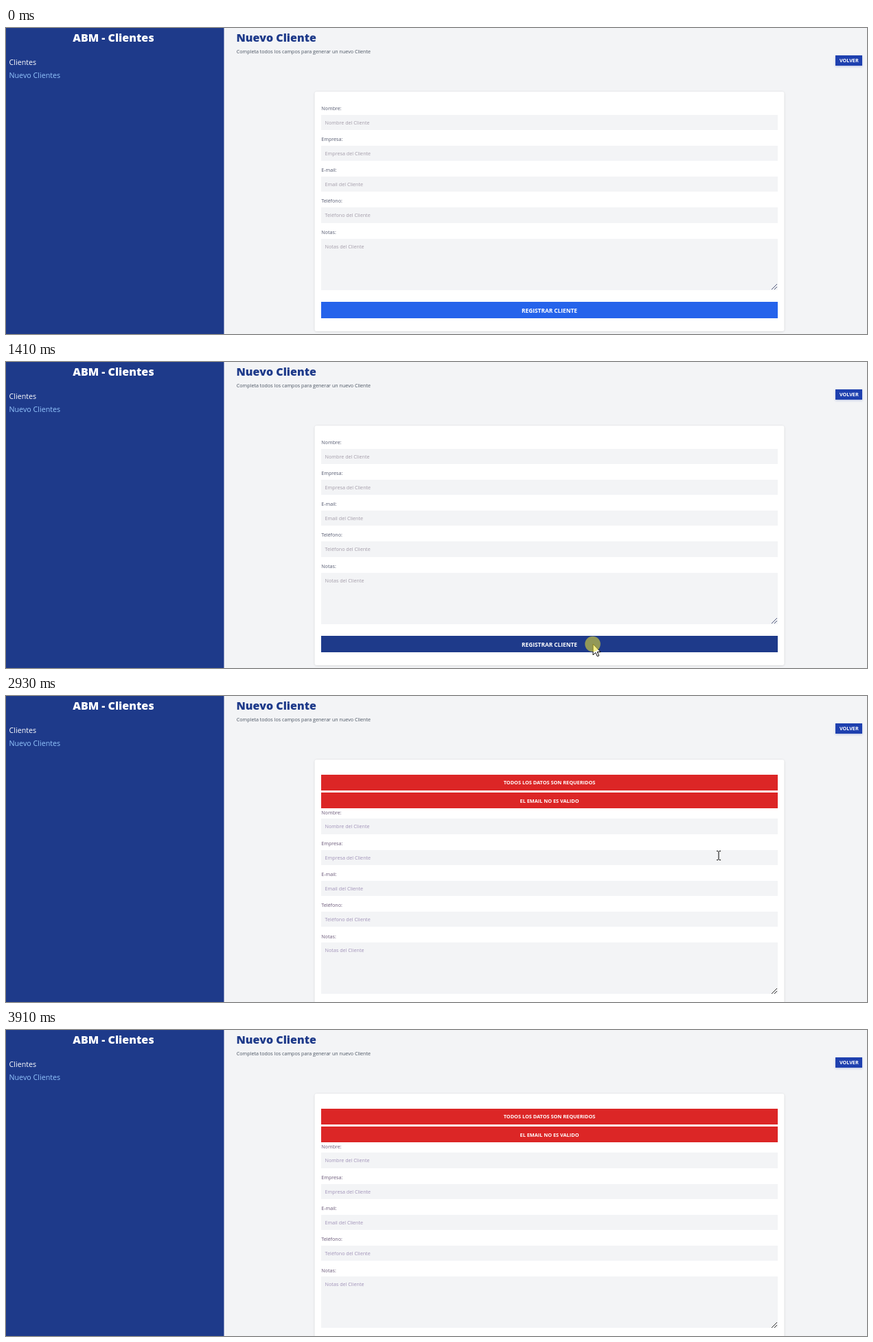
An HTML page with a canvas for the animation above (5.17 s loop, 1254 by 447 pixels).

```html
<!DOCTYPE html>
<html lang="es">
<head>
<meta charset="utf-8">
<title>Nuevo Cliente</title>
<style>
  html, body { margin: 0; width: 100%; height: 100%; overflow: hidden; background: #f3f4f6; }
  canvas { display: block; }
</style>
</head>
<body>
<canvas id="stage" width="1254" height="447"></canvas>
<script>
const ctx = document.getElementById('stage').getContext('2d');
const LOOP = 5170, HOVER = 790, CLICK = 1280, SUBMIT = 1470, GONE = 3910;
const NAVY = '#1e3a8a', GRAY = '#f3f4f6';
const LEFT = 459, RIGHT = 1124, PITCH = 45.25, SHIFT = 52.8;
const fields = [
  ['Nombre:', 'Nombre del Cliente'],
  ['Empresa:', 'Empresa del Cliente'],
  ['E-mail:', 'Email del Cliente'],
  ['Teléfono:', 'Teléfono del Cliente'],
  ['Notas:', 'Notas del Cliente'],
];

// Pointer moves, sampled in discrete steps like a screen capture
const moves = [
  { start: 650, end: 1140, steps: 7, from: [975, 434], to: [855, 412], ease: p => 1 - (1 - p) ** 1.61 },
  { start: 2660, end: 3000, steps: 5, from: [874, 405], to: [1127, 139], ease: p => p * p * (3 - 2 * p) },
  { start: 3300, end: 3770, steps: 7, from: [1127, 139], to: [1246, 421], ease: p => p * p * (3 - 2 * p) },
  { start: 3840, end: 3910, steps: 1, from: [1250, 431], to: [1256, 447], ease: p => p },
];

const ARROW = new Path2D('M0 0V16L3.7 12.5 6.3 18 8.7 17 6.2 11.6H11Z');
const HAND = new Path2D('M-2 13V1.5Q-2-.5 0-.5T2 1.5V7.5Q2 6 3.8 6T5.4 8Q5.8 7 7 7T8.6 9Q9 8 10 8T11 10V15Q11 18 9 20V22H0V20Q-2 17-6 12Q-6.3 10-4.5 10Q-3 11-2 13Z');
const KNUCKLES = new Path2D('M2 7.5V11M5.4 8V11.5M8.6 9V12');
const BEAM = new Path2D('M-3-6.5H-1L0-5.5 1-6.5H3M0-5.5V5.5M-3 6.5H-1L0 5.5 1 6.5H3');

function box(x0, y0, x1, y1, color) {
  const top = Math.round(y0);
  ctx.fillStyle = color;
  ctx.fillRect(x0, top, x1 - x0, Math.round(y1) - top);
}

function text(str, x, y, size, color, weight = 400, align = 'left') {
  ctx.font = `${weight} ${size}px "Open Sans", "Noto Sans", sans-serif`;
  ctx.textAlign = align;
  ctx.fillStyle = color;
  ctx.fillText(str, x, y);
}

function shadow(color, blur, offset) {
  ctx.shadowColor = color;
  ctx.shadowBlur = blur;
  ctx.shadowOffsetY = offset;
}

function drawPage() {
  box(0, 0, 1254, 447, GRAY);
  box(0, 0, 317.5, 447, NAVY);
  text('ABM - Clientes', 156.5, 20, 16, '#fff', 800, 'center');
  text('Clientes', 4.5, 53.5, 10.7, '#fff');
  text('Nuevo Clientes', 4.5, 72.5, 10.7, '#93c5fd');
  text('Nuevo Cliente', 335.5, 20, 16, NAVY, 800);
  text('Completa todos los campos para generar un nuevo Cliente', 335.7, 37, 7.17, '#4b5563');
  shadow('rgba(30,64,175,.3)', 3, 1);
  box(1208, 40, 1247, 55, '#1e40af');
  shadow('transparent', 0, 0);
  text('VOLVER', 1227.8, 50, 7.2, '#fff', 700, 'center');
}

function drawForm(failed, hover) {
  const dy = failed ? SHIFT : 0, mid = (LEFT + RIGHT) / 2;
  shadow('rgba(0,0,0,.14)', 3, .5);
  ctx.fillStyle = '#fff';
  ctx.beginPath();
  ctx.roundRect(449.5, 93, 684, 350 + dy, 3);
  ctx.fill();
  shadow('transparent', 0, 0);

  if (failed) {
    ['TODOS LOS DATOS SON REQUERIDOS', 'EL EMAIL NO ES VALIDO'].forEach((message, i) => {
      const y = 115 + i * 26.4;
      box(LEFT, y, RIGHT, y + 22.6, '#dc2626');
      text(message, mid, y + 14.3, 7.35, '#fff', 700, 'center');
    });
  }
  fields.forEach(([label, hint], i) => {
    const y = 126.5 + dy + i * PITCH;
    text(label, LEFT + .2, y - 6.8, 7.2, failed ? '#6a5878' : '#555a70');
    box(LEFT, y, RIGHT, y + (i < 4 ? 22.4 : 75), GRAY);
    text(hint, 464.6, y + 14, 7.2, failed ? '#a092b8' : '#a39ca9');
  });

  const bottom = Math.round(382 + dy);
  ctx.strokeStyle = failed ? '#333' : '#50597c';
  ctx.lineWidth = 1;
  ctx.beginPath();
  for (const size of [8, 4]) {
    ctx.moveTo(1123 - size, bottom);
    ctx.lineTo(1123, bottom - size);
  }
  ctx.stroke();
  box(LEFT, 400 + dy, RIGHT, 424.3 + dy, hover ? NAVY : '#2563eb');
  text('REGISTRAR CLIENTE', mid, 415.5 + dy, 8.33, '#fff', 700, 'center');
}

function pointerAt(t) {
  const m = moves.filter(move => t >= move.start).pop();
  const step = Math.floor((t - m.start) / (m.end - m.start) * m.steps + 1e-6);
  const p = m.ease(Math.min(1, step / m.steps));
  return m.from.map((v, i) => Math.round(v + (m.to[i] - v) * p));
}

function overField(x, y) {
  return x >= LEFT && x < RIGHT && fields.some((_, i) => {
    const top = 126.5 + SHIFT + i * PITCH;
    return y >= top && y < top + (i < 4 ? 22.4 : 75);
  });
}

function drawPointer(t, x, y) {
  const failed = t >= SUBMIT;
  const clicking = t >= CLICK && !failed;
  ctx.save();
  ctx.translate(x, y);
  ctx.lineWidth = 1;
  ctx.lineJoin = 'round';
  ctx.strokeStyle = '#000';
  ctx.fillStyle = '#fff';
  if (t >= 2660 && overField(x, y)) {
    ctx.stroke(BEAM);
  } else {
    const hand = t < 2660 && y < 424 && !clicking;
    const shape = hand ? HAND : ARROW;
    if (hand && failed) ctx.strokeStyle = '#651c2c';
    ctx.lineWidth = hand ? 1.2 : 1;
    ctx.fill(shape);
    ctx.stroke(shape);
    if (hand) ctx.stroke(KNUCKLES);
  }
  if (clicking) {
    ctx.fillStyle = 'rgba(238,226,50,.56)';
    ctx.beginPath();
    ctx.arc(-.5, 0, 11.3, 0, Math.PI * 2);
    ctx.fill();
  }
  ctx.restore();
}

function render(now) {
  const t = now % LOOP;
  const visible = t >= 650 && t < GONE;
  const [x, y] = visible ? pointerAt(t) : [0, 0];
  drawPage();
  drawForm(t >= SUBMIT, t >= HOVER - 140 && t < SUBMIT && y < 424);
  if (visible) drawPointer(t, x, y);
}

const began = performance.now();
function tick() {
  render(performance.now() - began);
  requestAnimationFrame(tick);
}
tick();
</script>
</body>
</html>
```
